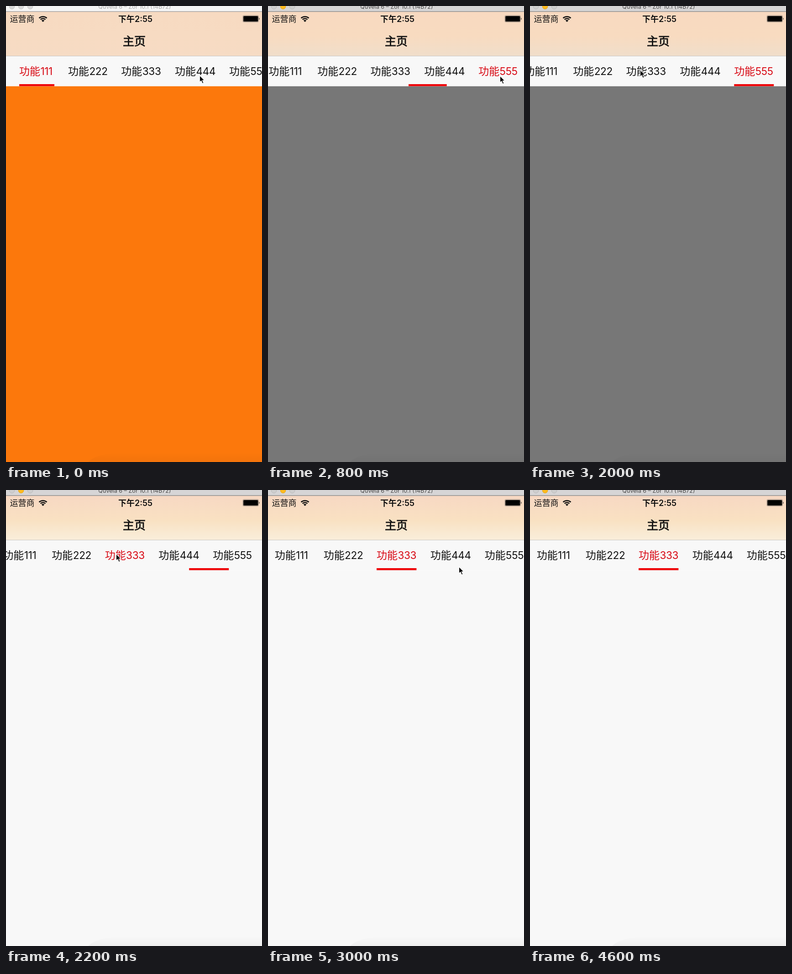
Recreate the animation shown at these times as an HTML page. Size 561 by 998 pixels, loop 4800 ms.

```html
<!DOCTYPE html>
<html lang="zh">
<head>
<meta charset="utf-8">
<title>主页</title>
<style>
  html, body { margin: 0; width: 100%; height: 100%; overflow: hidden; }
  svg { display: block; width: 100%; height: 100%; }
  text { font-family: Inter, "Noto Sans CJK SC", "Noto Sans CJK", sans-serif; fill: #111; }
  .tab { font-size: 23px; }
  .digits { font-size: 22.6px; letter-spacing: -.35px; }
</style>
</head>
<body>
<svg viewBox="0 0 561 998">
  <defs>
    <linearGradient id="navFill" x2="0" y2="1">
      <stop class="stop"/>
      <stop class="stop" offset=".55"/>
      <stop class="stop" offset="1"/>
    </linearGradient>
    <linearGradient id="shade" x2="0" y2="1">
      <stop stop-opacity="0"/>
      <stop offset="1" stop-opacity=".04"/>
    </linearGradient>
  </defs>

  <rect id="page" y="175.4" width="561" height="823"/>
  <path d="M180 998Q195 982 240 978H561V998Z" fill="url(#shade)"/>

  <rect y="12" width="561" height="98" fill="url(#navFill)"/>
  <rect y="110" width="561" height="65.4" fill="#f8f8f8"/>
  <rect y="109" width="561" height="1" fill="#c9c6c3"/>

  <rect id="bar" width="561" height="12"/>
  <rect id="edge" y="11.5" width="561" height="1.3"/>
  <g stroke-width="1">
    <circle class="button" cx="13" cy="1" r="5.8"/>
    <circle class="button" cx="33" cy="1" r="5.8"/>
    <circle class="button" cx="53" cy="1" r="5.8"/>
  </g>
  <text id="caption" x="282" y="6" font-size="12.6" text-anchor="middle">Quvela 6 – Zor 10.1 (14B72)</text>

  <text x="8.5" y="35" font-size="18">运营商</text>
  <g fill="none" stroke="#111" stroke-width="2.5">
    <path d="M72.5 26.5A12.5 12.5 0 0 1 89.5 26.5M75.6 29.7A8 8 0 0 1 86.4 29.7"/>
    <path d="M81 35L77.7 31.8A4.8 4.8 0 0 1 84.3 31.8Z" fill="#111" stroke="none"/>
  </g>
  <text x="283.5" y="34.5" font-size="18" font-weight="600" text-anchor="middle">下午2:55</text>
  <rect x="519" y="20.8" width="34.5" height="14.4" rx="2.5" fill="none" stroke="#77706a" stroke-width=".8"/>
  <rect x="520.2" y="22" width="32.1" height="12" rx="1.5"/>
  <path d="M554.6 25.5Q556.6 28 554.6 30.5Z"/>
  <text x="281" y="85.5" font-size="25" font-weight="500" text-anchor="middle" stroke="#111" stroke-width=".8">主页</text>

  <g id="strip">
    <rect id="line" y="171" height="4.5" fill="#ee0408"/>
  </g>
  <path id="cursor" d="M0 0V14.5L3.4 11.6L6 17.6L8.6 16.5L6 10.7H10.4Z" stroke="#fff" stroke-width="1.1"/>
</svg>
<script>
const $ = id => document.getElementById(id);
const LOOP = 4800, TICK = 200, SLIDE = 300;

const tabX = [29, 136, 252.3, 370, 489];
const tabW = [77, 86, 87.4, 88, 87];
tabX.forEach((x, i) => $('strip').insertAdjacentHTML('beforeend',
  `<text class="tab" x="${x}" y="151">功能<tspan class="digits" dx=".4">${String(i + 1).repeat(3)}</tspan></text>`));
const tabs = document.querySelectorAll('.tab');
const stops = document.querySelectorAll('.stop');
const buttons = document.querySelectorAll('.button');

// Each view: selected tab, strip offset, slide start, page colour, nav gradient.
const views = [
  { tab: 0, scroll: 0, start: -SLIDE, page: '#fc780c', nav: ['#f7dac1', '#f7dbc2', '#f6dbc4'] },
  { tab: 4, scroll: 41.7, start: 616, page: '#777', nav: ['#f8d9c0', '#f8dbc0', '#f0decb'] },
  { tab: 2, scroll: 14.3, start: 2109, page: '#f8f8f8', nav: ['#f7d8c3', '#f9e1c2', '#f9eedb'] }
];

// Pointer path: time, x, y
const pointer = [
  [0, 424.5, 152], [200, 440, 156], [400, 499, 157], [600, 516.5, 148], [800, 508.5, 153],
  [1000, 504, 158], [1400, 443, 158], [1600, 443, 160], [1800, 455, 148],
  [2000, 241.5, 140], [2400, 241.5, 140], [2600, 340, 163], [2800, 395, 165],
  [3000, 418.5, 168], [3200, 418.5, 168], [3400, 424, 173]
];

const mix = (a, b, p) => a + (b - a) * p;
const ease = p => { p = Math.min(1, Math.max(0, p)); return p * p * (3 - 2 * p); };
const set = (el, attrs) => { for (const k in attrs) el.setAttribute(k, attrs[k]); };

function drawWindow(active) {
  set($('bar'), { fill: active ? '#d6d5d6' : '#f5f5f5' });
  set($('edge'), { fill: active ? '#858585' : '#9c9a99' });
  $('caption').style.fill = active ? '#4a4a4a' : '#ababab';
  buttons.forEach((b, i) => set(b, active && i === 1
    ? { fill: '#fdbb1f', stroke: '#e3a51c' }
    : { fill: active ? '#cecece' : '#d8d8d8', stroke: active ? '#b9b9b9' : '#c4c4c4' }));
}

function drawTabs(t) {
  const n = views.filter(v => t >= v.start).length - 1;
  const view = views[n], from = views[Math.max(0, n - 1)];
  const p = ease((t - view.start) / SLIDE);
  set($('strip'), { transform: `translate(${-mix(from.scroll, view.scroll, p)})` });
  set($('line'), {
    x: mix(tabX[from.tab], tabX[view.tab], p),
    width: mix(tabW[from.tab], tabW[view.tab], p)
  });
  tabs.forEach((el, i) => el.style.fill = i === view.tab ? '#d80914' : '#111');
  set($('page'), { fill: view.page });
  stops.forEach((s, i) => set(s, { 'stop-color': view.nav[i] }));
}

function drawPointer(t) {
  const i = pointer.findIndex(k => k[0] >= t);
  $('cursor').style.display = i < 0 ? 'none' : '';
  if (i < 0) return;
  const b = pointer[i], a = pointer[Math.max(0, i - 1)];
  const p = a === b ? 0 : (t - a[0]) / (b[0] - a[0]);
  set($('cursor'), { transform: `translate(${mix(a[1], b[1], p)} ${mix(a[2], b[2], p)})` });
}

function draw() {
  // The picture advances in even steps.
  const t = Math.floor(performance.now() % LOOP / TICK) * TICK;
  drawWindow(t >= 600);
  drawTabs(t);
  drawPointer(t);
  requestAnimationFrame(draw);
}
draw();
</script>
</body>
</html>
```
